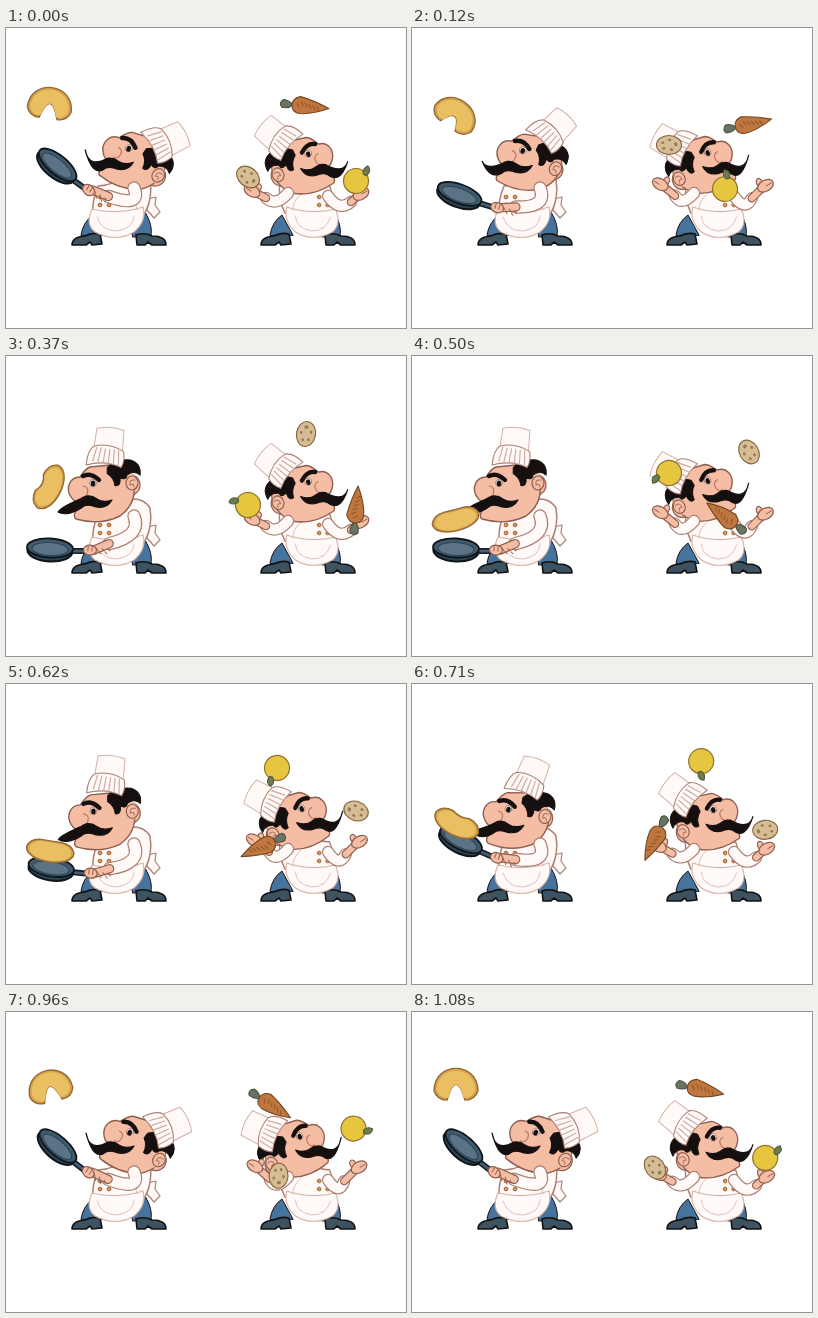
Write an HTML page with a canvas that moves like this. It is 400x300 px and loops after 1.12 s.

```html
<!DOCTYPE html>
<html lang="en">
<head>
<meta charset="utf-8">
<title>Two chefs</title>
<style>
html, body { margin: 0; width: 100%; height: 100%; overflow: hidden; background: #fff; }
canvas { display: block; width: 400px; height: 300px; }
</style>
</head>
<body>
<canvas id="stage" width="400" height="300"></canvas>
<script>
const ctx = document.getElementById('stage').getContext('2d');
const LOOP = 1120, STEPS = 27;
const SKIN = '#f5bda3', SKIN_LINE = '#8d5f50', CLOTH = '#fffaf8', CLOTH_LINE = '#ad8074', INK = '#15100f';

// Head poses: looking ahead and leaning back
const LOW = { hat: [101, 92, 9], face: [94, 138, 0], ear: [126, 127, 1], whiskers: [83, 144, -31, 12] };
const HIGH = { hat: [162, 114, 68], face: [126, 133, 23], ear: [153, 148, 36], whiskers: [105, 134, -25, -13] };

// Closed juggling path, one point every three steps
const RING = [[300, 78], [337, 96], [350, 127], [350, 153], [313, 161], [256, 163], [242, 149], [257, 117], [271, 84]];

const rad = d => d * Math.PI / 180;
const mix = (a, b, k) => a.map((v, i) => v + (b[i] - v) * k);
const smooth = k => { k = Math.min(1, Math.max(0, k)); return k * k * (3 - 2 * k); };

function shape(d, fill, line, width = 1.2) {
  const p = new Path2D(d);
  if (fill) { ctx.fillStyle = fill; ctx.fill(p); }
  if (line) { ctx.strokeStyle = line; ctx.lineWidth = width; ctx.stroke(p); }
}

function oval(x, y, rx, ry, fill, line, width = 1.2, deg = 0) {
  ctx.beginPath();
  ctx.ellipse(x, y, rx, ry, rad(deg), 0, 7);
  if (fill) { ctx.fillStyle = fill; ctx.fill(); }
  if (line) { ctx.strokeStyle = line; ctx.lineWidth = width; ctx.stroke(); }
}

function placed(x, y, deg, draw) {
  ctx.save();
  ctx.translate(x, y);
  ctx.rotate(rad(deg));
  draw();
  ctx.restore();
}

function limb(d, width, fill, line) {
  shape(d, null, line, width + 2.4);
  shape(d, null, fill, width);
}

function drawLegs() {
  shape('M75 207Q77 194 87 187L98 207Z', '#47749f', INK, 1);
  shape('M124 190L139 184Q147 197 145 208L127 209Z', '#47749f', INK, 1);
  shape('M66 217Q66 209 79 208Q86 204 94 206L96 216L86 217L84 214L80 217Z', '#3c5362', INK, 1.6);
  shape('M131 217L130 207Q139 204 146 208Q160 208 160 217L146 217L142 214L139 217Z', '#3c5362', INK, 1.6);
}

function drawTorso() {
  shape('M92 158Q86 172 87 185L139 185Q147 170 144 152Q138 142 125 143Q108 158 92 158Z', CLOTH, CLOTH_LINE, 1.5);
  shape('M86 181Q79 196 89 204Q110 215 128 204Q141 193 137 179Q112 187 86 181Z', CLOTH, '#d6b3a8');
  shape('M91 189Q95 203 111 203Q128 200 128 188M122 166Q130 172 131 182', null, '#dfc0b7', 1);
  for (const x of [94, 103]) for (const y of [169, 177]) oval(x, y, 1.9, 1.9, '#df9450', '#9b5f35', .9);
}

function drawHead(lean) {
  const { hat, face, ear, whiskers } = Object.fromEntries(
    Object.keys(LOW).map(part => [part, mix(LOW[part], HIGH[part], lean)]));
  hat[1] -= 21 * lean * (1 - lean);   // the hat swings on an arc

  placed(...ear, () => oval(-4, 2, 12, 11, SKIN, SKIN_LINE));
  placed(...face, () => {
    shape('M-10-27C-15-25-18-20-20-17C-30-17-35-6-29 3C-26 8-20 9-17 9C-24 14-28 22-24 25Q0 32 20 22Q36 10 34-8Q30-26 10-29Z', SKIN, SKIN_LINE, 1.4);
    shape('M-17-8Q-10-7-13 1Q-15 4-18 3', null, '#b87767', 1.2);
  });
  placed(...ear, () => {
    oval(-4, 0, 10, 10, SKIN);
    shape('M-25-15Q-17-24-2-23Q9-20 8-8Q2-13-5-8Q-6-2-12-5Q-11 4-17 3Q-18-5-25-9Z', INK, INK, 1);
    oval(0, 0, 6, 7, SKIN, SKIN_LINE);
    shape('M3-3Q-3-4-2 2M-2 2Q2 0 2 4', null, '#a8705f', 1);
  });
  placed(...hat, () => {
    shape('M-13 2L-13-18Q0-23 14-20L16 3Z', CLOTH, '#d3b0a6', 1);
    shape('M-18 20Q-19 5-13 0Q2-6 17 1Q20 10 17 17Q0 12-18 20Z', CLOTH, CLOTH_LINE, 1.1);
    for (let x = -12; x <= 14; x += 5.2) shape(`M${x} 15L${x * .85} 1`, null, '#cfaaa0', 1.2);
  });
  placed(...face, () => {
    oval(-7, -11, 3.4, 3.6, '#fff', SKIN_LINE, .7);
    oval(-7, -10.5, 2.3, 2.9, INK);
    shape('M-17-18Q-9-22-1-14', null, INK, 4.4);
  });
  const [cx, cy, tx, ty] = whiskers;
  placed(cx, cy, 0, () => shape(
    `M${tx} ${ty}C${tx * .9} ${ty * .2 + 4}-14 2-3-4Q3-5 8-1Q14 3 23 0Q18 9 7 7Q0 4-5 6C-14 13 ${tx * .8} ${ty * .4 + 11} ${tx} ${ty}Z`,
    INK, INK, 1.2));
}

function drawPan({ x, y, deg }) {
  placed(x, y, deg, () => {
    shape('M20 2L38 1', null, '#16212d', 6);
    shape('M21 2L37 1', null, '#465f70', 2.6);
    oval(0, 3, 22.5, 10.5, '#2d4252', '#0f1519', 2);
    oval(0, 0, 23, 9.5, '#3f5a6c', '#0f1519', 1.8);
    oval(0, 1, 18, 6.5, '#5a7485', '#2a4253', 1);
  });
  const hx = x + 40 * Math.cos(rad(deg)), hy = y + 40 * Math.sin(rad(deg));
  const [ex, ey] = mix([hx, hy], [132, 178], .4);
  limb(`M128 160Q136 180 ${ex} ${ey}`, 11, CLOTH, CLOTH_LINE);
  limb(`M${ex} ${ey}L${hx + 4} ${hy}`, 7, SKIN, SKIN_LINE);
  oval(hx, hy, 6.5, 5, SKIN, SKIN_LINE, 1.2, deg);
  placed(hx, hy, deg * .8, () => {
    shape('M-2-4L-2 1M2-4L2 1', null, '#98624a', 1);
    for (let i = 0; i < 5; i++) shape(`M${6 + i * 3} ${i % 2 * 3 - 2}l2 2`, null, '#98624a', 1);
  });
}

function drawCake({ y, deg, bend }) {
  const w = 24 - 2 * bend, mid = 2 + 4 * bend, top = -14 - 10 * bend, end = mid + 9, notch = 11 - 27 * bend;
  const d = `M${-w} ${mid}C${-w} ${top} ${w} ${top} ${w} ${mid}Q${w - 3} ${end} 9 ${end}Q0 ${notch}-9 ${end}Q${3 - w} ${end} ${-w} ${mid}Z`;
  placed(44, y, deg, () => {
    shape(d, '#d6a14c', '#946933', 1.4);
    ctx.scale(.88, .86);
    shape(d, '#e9bf62');
  });
}

function drawCarrot() {
  shape('M-13 0Q-17-5-23-5Q-28-1-24 3Q-17 4-13 0Z', '#667662', '#454c40', 1);
  shape('M-14 0Q-14-7-6-9Q8-6 23 1Q7 8-6 8Q-14 7-14 0Z', '#c0763f', '#75461f', 1.1);
  for (let x = -9; x < 15; x += 4) shape(`M${x} ${x % 3 - 2}l2 4`, null, '#8e5424', 1);
}

function drawPotato() {
  oval(0, 0, 12.5, 9.5, '#d8bd94', '#80623f', 1.1);
  for (let i = 0; i < 6; i++) oval(7 * Math.cos(i * 1.2), 5 * Math.sin(i * 1.2), 1.6, 1.3, '#8f7a5c');
}

function drawApple() {
  shape('M10 0L16-1', null, '#5c5436', 2);
  oval(0, 0, 12.5, 12.5, '#e6c53f', '#917130', 1.2);
  shape('M10 0Q13-5 19-3Q19 4 11 3Z', '#6d7c4e', '#48583a', 1);
}

function drawArm(sleeve, [cx, cy], [x, y], side) {
  limb(`${sleeve} ${cx} ${cy}`, 10, CLOTH, CLOTH_LINE);
  limb(`M${cx} ${cy}L${x} ${y}`, 6, SKIN, SKIN_LINE);
  oval(x - side * 4, y - 4, 3, 4.5, SKIN, SKIN_LINE, 1.2, -side * 25);
  oval(x + side * 2, y - 1, 8.5, 5.5, SKIN, SKIN_LINE, 1.2, -side * 30);
  shape(`M${x + side * 3} ${y - 1}l${side * 5}-3`, null, SKIN_LINE, 1);
}

// Three things share the ring, a third of a loop apart.
function juggle(n, offset, deg, sway, draw) {
  const phase = (n - offset + STEPS) % STEPS, i = Math.floor(phase / 3), k = phase / 3 - i;
  const [a, b, c, d] = [-1, 0, 1, 2].map(j => RING[(i + j + 9) % 9]);
  const [x, y] = b.map((v, j) => v + .5 * k * (c[j] - a[j]
    + k * (2 * a[j] - 5 * v + 4 * c[j] - d[j] + k * (3 * (v - c[j]) + d[j] - a[j]))));
  const turn = phase / STEPS;
  placed(x, y, deg - 360 * turn + sway * Math.sin(2 * Math.PI * turn), draw);
}

function panAt(n) {
  const lift = 1 - smooth((n + 1) / 7.5) + smooth((n - 13.5) / 6);
  return { x: 44 + 8 * lift, y: 192 - 58 * lift, deg: 3 + 38 * lift };
}

// The pancake rests in the pan, is tossed, hangs and drops back.
function cakeAt(n, pan) {
  let y = pan.y - 15, deg = 180 + pan.deg;
  if (n > 17) {
    const left = Math.max(0, 1 - (n - 17) / 8.5);
    y = 73 + 65 * left ** 3;
    deg = 360 - 155 * left ** 2;
  } else if (n < 13) {
    const fall = (n + 1.5) / 14.5;
    y = 74 + 103 * fall ** 1.8;
    deg = 183 * fall ** 1.4;
  }
  return { y, deg, bend: Math.max(0, (177 - y) / 103) ** 2 };
}

function render(n) {
  ctx.clearRect(0, 0, 400, 300);
  ctx.lineCap = ctx.lineJoin = 'round';

  const pan = panAt(n);
  drawLegs();
  shape('M141 171L150 169L149 177L154 184L148 190L141 182Z', CLOTH, CLOTH_LINE);
  drawTorso();
  drawHead(1 - smooth((n + 1) / 10) + smooth((n - 14.5) / 7.5));
  drawPan(pan);
  drawCake(cakeAt(n, pan));

  // The juggler faces the other way and nods with every catch.
  const nod = .5 - .5 * Math.cos(2 * Math.PI * n / 9);
  placed(189, 0, 0, drawLegs);
  ctx.save();
  ctx.transform(-.95, 0, 0, 1, 411, 0);
  drawTorso();
  ctx.translate(0, 4);
  drawHead(.75 + .25 * nod);
  ctx.restore();
  drawArm('M282 165Q270 179', mix([260, 170], [264, 167], nod), mix([248, 164], [251, 155], nod), -1);
  drawArm('M322 168Q333 184', mix([345, 174], [338, 169], nod), mix([353, 167], [351, 156], nod), 1);

  juggle(n, 0, 4, 33, drawCarrot);
  juggle(n, 9, -80, 0, drawPotato);
  juggle(n, 18, 77, 0, drawApple);
}

// 24 steps per second, each start rounded to 10 ms
const startOf = n => Math.ceil(n * 25 / 6 - .5 - 1e-9) * 10;

function stepAt(t) {
  let n = STEPS - 1;
  while (n > 0 && startOf(n) > t) n--;
  return n;
}

const begin = performance.now();
let shown = -1;
function tick() {
  const n = stepAt((performance.now() - begin) % LOOP);
  if (n !== shown) render(shown = n);
  requestAnimationFrame(tick);
}
tick();
</script>
</body>
</html>
```
